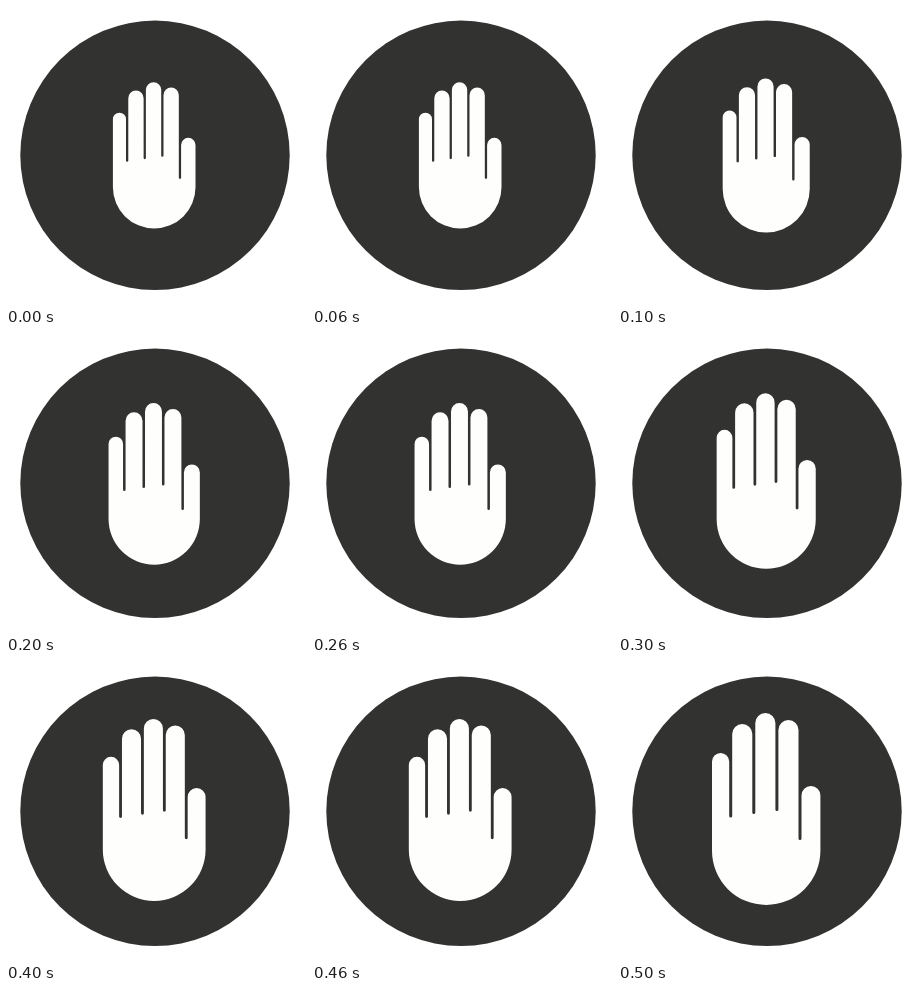
These frames come from a looping animation (300 px wide and 300 px high, 0.6 s). An HTML page:

```html
<!DOCTYPE html>
<html lang="en">
<head>
<meta charset="utf-8">
<title>Growing hand</title>
<style>
  html, body { margin: 0; width: 100%; height: 100%; overflow: hidden; background: #fff; }
  svg { display: block; width: 100%; height: 100%; }
</style>
</head>
<body>
<svg viewBox="0 0 300 300">
  <circle cx="149" cy="149.3" r="134.7" fill="#323330"/>
  <path id="hand" fill="#fefffd"/>
</svg>
<script>
const hand = document.getElementById('hand');

// Hand at full size; the origin is the middle of the palm's lower edge
const radius = 54.2, gap = 1.5, pitch = 23.1;
const tips = [-152, -181, -192, -185, -119];
const roots = [-87.5, -91, -94, -65];
const gapX = i => -35.5 + pitch * i;

function outline() {
  let d = `M${-radius} ${-radius}`;
  tips.forEach((tip, i) => {
    const left = i ? gapX(i - 1) + gap : -radius;
    const right = i < roots.length ? gapX(i) - gap : radius;
    const r = (right - left) / 2;
    d += `V${tip + r}a${r} ${r} 0 0 1 ${2 * r} 0`;
    if (i < roots.length) d += `V${roots[i] - gap}a${gap} ${gap} 0 0 0 ${2 * gap} 0`;
  });
  return d + `V${-radius}A${radius} ${radius} 0 0 1 ${-radius} ${-radius}Z`;
}
hand.setAttribute('d', outline());

// The hand grows in held steps while its lower edge sinks evenly
const scales = [0.762, 0.803, 0.842, 0.914, 0.948, 1];
const hold = 100;

function draw(time) {
  const step = Math.floor(time / hold) % scales.length;
  const bottom = 222.5 + 4.1 * step;
  hand.setAttribute('transform', `translate(148.2 ${bottom}) scale(${scales[step]})`);
}

const start = performance.now();
function tick() {
  draw(performance.now() - start);
  requestAnimationFrame(tick);
}
tick();
</script>
</body>
</html>
```
